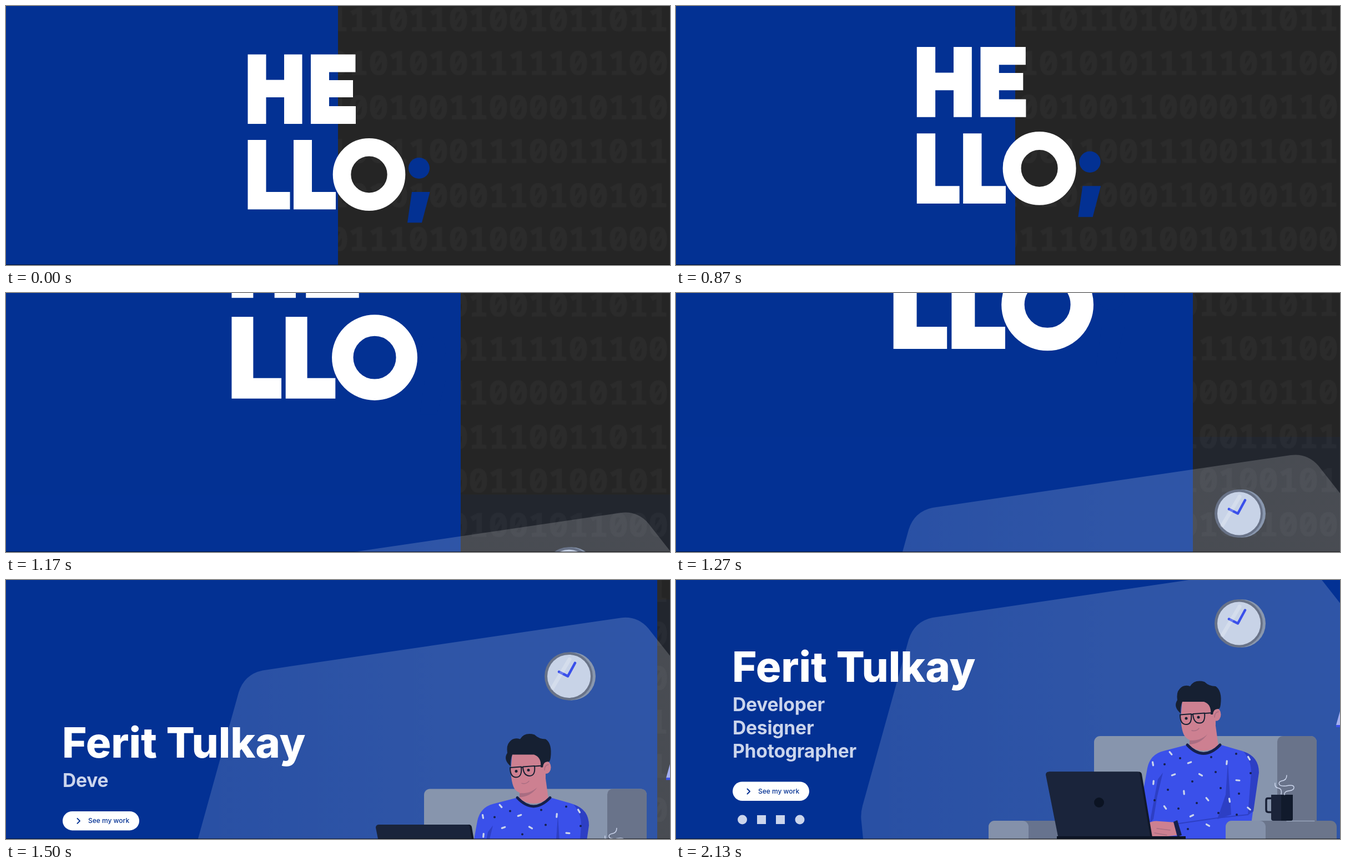
An HTML page for the animation above (2160 ms loop, 1196 by 468 pixels).

```html
<!DOCTYPE html>
<html lang="en">
<head>
<meta charset="utf-8">
<title>Hello</title>
<style>
  html, body { margin: 0; height: 100%; overflow: hidden; background: #252525; }
  svg { display: block; width: 100vw; height: 100vh; font-family: Inter, sans-serif; }
  #digits { font: 700 60px "Noto Sans Mono", monospace; fill: #2b2b2b; stroke: #2b2b2b; stroke-width: 1.5; text-anchor: middle; }
  #name { font-size: 76px; font-weight: 800; fill: #fff; }
  #roles { font-size: 33.6px; font-weight: 700; fill: #cbd5ec; letter-spacing: -.2px; }
  .line { fill: none; stroke-linecap: round; stroke-linejoin: round; }
</style>
</head>
<body>
<svg viewBox="0 0 1196 468" preserveAspectRatio="none">
  <linearGradient id="glass">
    <stop offset="0" stop-color="#fff" stop-opacity=".15"/>
    <stop offset=".5" stop-color="#fff" stop-opacity=".175"/>
  </linearGradient>
  <rect width="1196" height="468" fill="#252525"/>
  <g id="digits"></g>
  <rect id="blue" height="468" fill="#033193"/>

  <g id="hello" fill="#fff">
    <path d="M435.5 87.5h33v46h32.500v-46h32.500V213H501v-48h-32.500v48h-33z"/>
    <path d="M549 87.500h80.500v32H582V134h43v31h-43v16h48v32h-81z"/>
    <path d="M435.500 242h33v94h43v31.500h-76zM518 242h33v94h43v31.500h-76z"/>
    <ellipse cx="654" cy="304.500" rx="49" ry="49.300" fill="none" stroke="#fff" stroke-width="32.600"/>
    <g fill="#033193">
      <circle cx="744" cy="293" r="19"/>
      <path d="M731 336h32.500L749 391.500h-26z"/>
    </g>
  </g>

  <g id="page">
    <rect y="-60" width="1196" height="530" fill="#033193" fill-opacity=".08"/>
    <path fill="url(#glass)" d="M462 68 1107-27Q1137-31 1157-8L1230 85V700H360L334 437Q332 423 336 408L419 108Q429 75 462 68z"/>

    <!-- clock -->
    <circle cx="1018.500" cy="78.500" r="43.500" fill="#8997ae"/>
    <circle cx="1013.500" cy="78.500" r="43.500" fill="#697388"/>
    <circle cx="1014" cy="78.500" r="39" fill="#c8d3e7"/>
    <path class="line" stroke="#3a50ea" stroke-width="4.500" d="M996 70.500 1012 78.500 1025 54.500"/>
    <path class="line" stroke="#fff" stroke-opacity=".22" stroke-width="7" d="M984 100 1015 48"/>

    <!-- lamp -->
    <path fill="#a4aff0" d="M1196 237V262H1189z"/>
    <path fill="#3a50ea" d="M1189 262h8v4h-8z"/>

    <!-- sofa -->
    <rect x="753" y="282" width="401" height="240" rx="11" fill="#8795ad"/>
    <rect x="1083" y="282" width="71" height="240" rx="10" fill="#69738a"/>
    <rect x="563" y="435" width="160" height="80" rx="11" fill="#67738e"/>
    <rect x="563" y="435" width="72" height="80" rx="11" fill="#8491aa"/>

    <!-- body -->
    <path fill="#3a50ea" d="M920 298 878 309Q854 315 849 340L840 390 858 470H1032L1049 348Q1050 319 1020 309L982 298Q951 330 920 298z"/>
    <path fill="#2d3fc4" d="M1022 310Q1050 319 1050 348L1040 418 1030 425 1036 348Q1036 325 1022 310zM877 348 867 390 860 432 853 440 868 360zM994 330 990 388 975 432 1000 424z"/>
    <path class="line" stroke="#2d3fc4" stroke-width="2" d="M906 440 975 430 1030 424"/>
    <g id="confetti"></g>
    <path fill="#cd8091" d="M925 280V300Q950 317 977 300L971 256z"/>
    <path fill="#a96d82" d="M925 290Q945 289 957 279 945 296 925 297z"/>
    <path class="line" stroke="#16204c" stroke-width="5" d="M921 298Q950 329 980 298"/>

    <!-- head -->
    <path fill="#cd8091" d="M912 214 909 250Q911 278 918 284 925 292 938 289 955 286 972 262V214z"/>
    <ellipse cx="973" cy="243" rx="8.500" ry="11.500" fill="#cd8091"/>
    <path class="line" stroke="#a96d82" stroke-width="1.500" d="M970 248q0-9 7-10M929 272q8 2 13-4"/>
    <path fill="#162032" d="M909 241Q895 229 903 217 901 203 907 197 914 188 926 192 934 179 952 184 960 192 972 192 984 200 981 225 980 233 977 233 968 232 967 243H963Q965 225 951 220H912Q908 230 909 241z"/>
    <path class="line" stroke="#162032" stroke-width="2" d="M908 243.500 928 242q2 19-9 19t-11-17.500zM931 242 952 240.500q2 18-9 18t-12-16.500zM928 243h3M952 241 966 240"/>
    <g fill="#162032"><circle cx="919" cy="250" r="2.500"/><circle cx="941" cy="248" r="2.500"/></g>

    <!-- hand and laptop -->
    <path fill="#cd8091" d="M850 440Q858 434 872 436L899 438 905 461 858 466z"/>
    <path class="line" stroke="#a96d82" stroke-width="1.300" d="M866 449 890 452M862 457 884 461"/>
    <path fill="#16204c" d="M896 437 903 434 911 461 903 464z"/>
    <path fill="#101829" d="M672 346.500H834Q838 346.500 839 351L858 465H690z"/>
    <path fill="#1a243b" d="M671 346.500H831Q834 346.500 835 350L854 463H688L666 352Q666 347 671 346.500z"/>
    <circle cx="762" cy="402" r="9" fill="#0b1322"/>
    <path fill="#0d1526" d="M686 463H918V470H686z"/>

    <!-- armrest, mug, steam -->
    <rect x="990" y="435" width="200" height="80" rx="11" fill="#6b758b"/>
    <rect x="990" y="435" width="72" height="80" rx="11" fill="#8491aa"/>
    <path class="line" stroke="#98a5bb" stroke-width="1.300" d="M1100 435.500H1150"/>
    <path class="line" stroke="#182036" stroke-width="3.500" d="M1074 394.500H1066Q1063 394.500 1063 398V415Q1063 419.500 1067 419.500H1074"/>
    <path fill="#1b243a" d="M1072 388h39v43q0 4-4 4h-31q-4 0-4-4z"/>
    <path fill="#111a2c" d="M1090 388h21v43q0 4-4 4h-17z"/>
    <path class="line" stroke="#cbd5ec" stroke-width="1.500" d="M1079 367q-1 8 6 9 7 1 5 11M1100 353q0 9-9 10-7 2-4 7 3 3 12 2 14-3 14 3 0 5-9 6-9 1-8 7"/>

    <g id="heading">
      <text id="name" x="101" y="184"></text>
      <rect id="caret" y="128" width="11" height="71" fill="#fff"/>
      <g id="roles"><text x="102" y="237"/><text x="102" y="279"/><text x="102" y="321"/></g>
    </g>
    <g id="links" fill="#cbd5ec">
      <rect x="102" y="364.500" width="138" height="34.500" rx="17.250" fill="#fff"/>
      <path class="line" stroke="#033193" stroke-width="2" d="M128.500 377.500 133 382 128.500 386.500"/>
      <text x="148" y="386" font-size="12" font-weight="500" fill="#033193">See my work</text>
      <circle cx="119.500" cy="433" r="8.500"/>
      <rect x="146" y="425" width="16" height="16"/>
      <rect x="180" y="425" width="16" height="16"/>
      <circle cx="223" cy="433" r="8.500"/>
    </g>
  </g>
  <rect y="467" width="1196" height="1" fill="#000" fill-opacity=".6"/>
</svg>

<script>
const LOOP = 2160, PAGE = 629, NAME = 'Ferit Tulkay';
const ROLES = ['Developer', 'Designer', 'Photographer'];
const $ = id => document.getElementById(id);
const set = (id, key, value) => $(id).setAttribute(key, value);
const move = (id, y) => set(id, 'transform', `translate(0 ${y})`);
const clamp = (v, lo, hi) => Math.min(hi, Math.max(lo, v));

const columns = Array.from({length: 17}, (_, i) => 599 + 36 * i).join(' ');
$('digits').innerHTML = [
  '11101101001011011', '01010101111101100', '10010011000010110',
  '10011001110011011', '10101000110100101', '01110101001011000'
].map((row, i) => `<text x="${columns}" y="${44.5 + 79.5 * i}">${row}</text>`).join('');

// Shirt pattern: x, y, angle for the dashes; x, y for the dots
const dashes = [[859, 332, 80], [891, 313, 50], [925, 330, -20], [896, 352, -20], [945, 352, 30],
  [992, 330, 95], [1032, 322, 60], [1012, 362, 5], [915, 384, 85], [957, 396, 50], [881, 411, 55],
  [997, 398, 80], [929, 426, -25], [1032, 413, 40], [958, 443, 30], [860, 366, 95]];
const dots = [[880, 333], [908, 322], [964, 320], [1009, 314], [972, 347], [930, 364], [1035, 349],
  [886, 379], [981, 376], [1014, 386], [938, 403], [905, 413], [977, 421], [1010, 424], [862, 398], [922, 450]];
$('confetti').innerHTML =
  dashes.map(([x, y, a]) => `<rect x="-4.5" y="-1.6" width="9" height="3.2" rx="1.6" fill="#cbd5ec" transform="translate(${x} ${y}) rotate(${a})"/>`).join('') +
  dots.map(([x, y]) => `<circle cx="${x}" cy="${y}" r="2" fill="#16204c"/>`).join('');

// Scroll position over time, joined by a smooth monotone curve
const keys = [[740, 0], [870, 12], [1170, 204], [1400, 449], [1630, 605], [1810, PAGE]];
const slope = i => keys[i] && keys[i + 1] ? (keys[i + 1][1] - keys[i][1]) / (keys[i + 1][0] - keys[i][0]) : 0;
const tangent = i => {
  const a = slope(i - 1), b = slope(i);
  return a && b ? 2 * a * b / (a + b) : 0;
};
function scrollAt(t) {
  if (t <= keys[0][0]) return 0;
  const i = keys.findIndex(k => k[0] >= t) - 1;
  if (i < 0) return PAGE;
  const [t0, y0] = keys[i], [t1, y1] = keys[i + 1], d = t1 - t0, p = (t - t0) / d, q = 1 - p;
  return y0 * q * q * (1 + 2 * p) + y1 * p * p * (3 - 2 * p) + d * p * q * (q * tangent(i) - p * tangent(i + 1));
}

function draw(t) {
  const s = scrollAt(t), scale = 1 + s * 0.000873;
  set('blue', 'width', Math.min(1196, Math.round(597.6 + 1.079 * s)));
  move('digits', -0.011 * s);
  set('hello', 'transform', `translate(598 ${210 - s}) scale(${scale}) translate(-598 -210)`);
  move('page', PAGE - s);

  const typed = clamp(Math.floor((t - 1065) / 33.3), 0, NAME.length);
  $('name').textContent = NAME.slice(0, typed);
  set('caret', 'x', 104 + $('name').getComputedTextLength());
  set('caret', 'visibility', typed < NAME.length ? 'visible' : 'hidden');

  let left = clamp(Math.floor((t - 1480) / 4.8), 0, 29), lines = 0;
  ROLES.forEach((role, i) => {
    const part = role.slice(0, Math.max(0, left));
    if (part) lines++;
    $('roles').children[i].textContent = part;
    left -= role.length;
  });
  // The column stays centred while its lines appear
  const shift = 21 * (3 - Math.max(1, lines));
  move('heading', shift);
  move('links', -shift);
}

const start = performance.now();
function tick() {
  draw((performance.now() - start) % LOOP);
  requestAnimationFrame(tick);
}
tick();
</script>
</body>
</html>
```
